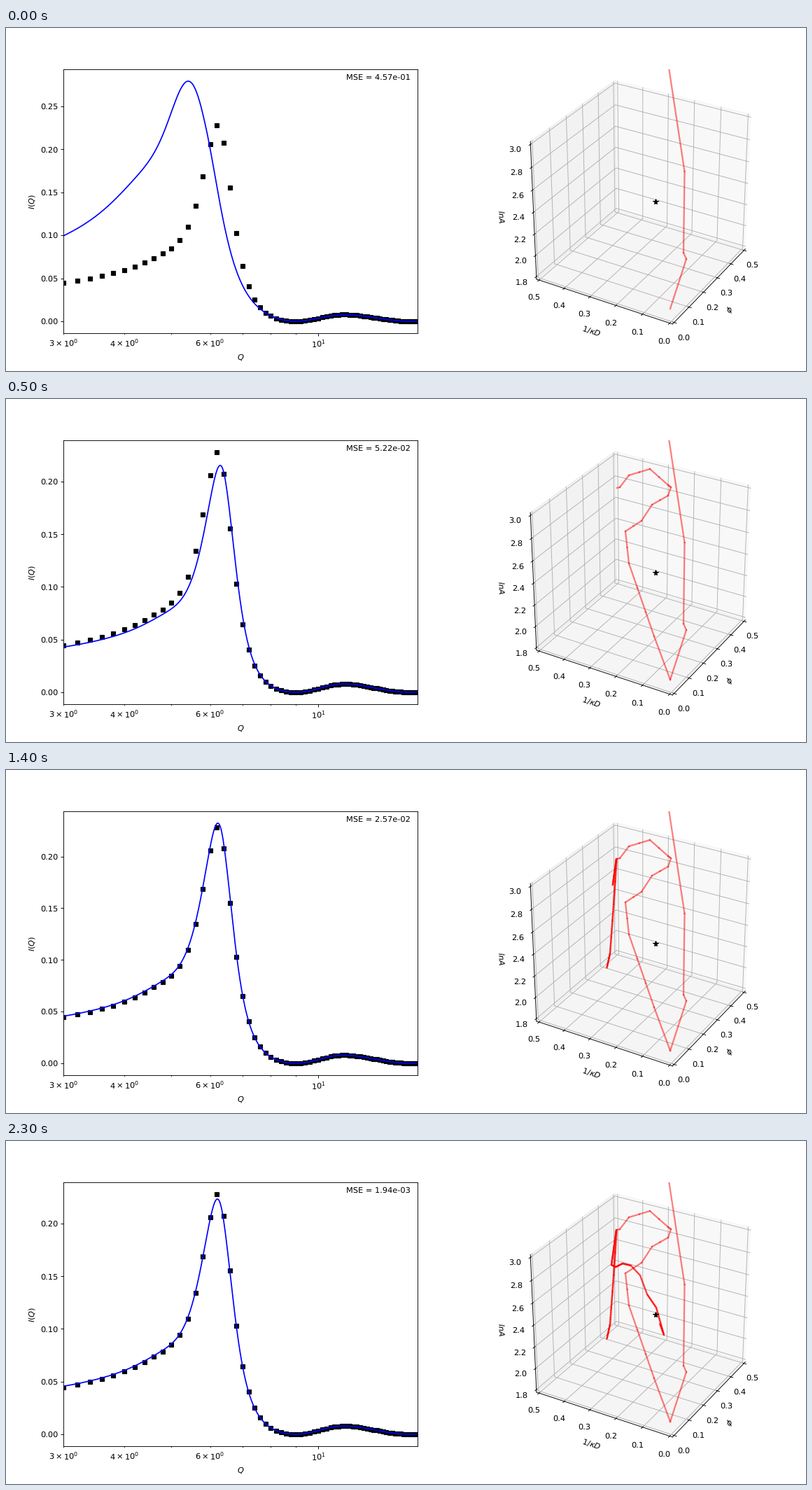
These frames come from a looping animation (1143x490 px, 2.5 s). A matplotlib script:

```python
import numpy as np
import matplotlib.pyplot as plt
from matplotlib.animation import FuncAnimation
from matplotlib.collections import LineCollection

plt.rcParams["text.hinting"] = "none"

W, H, DPI = 1143, 490, 81.625
BOTTOM, HEIGHT = 0.11, 0.77
FRAMES, LAST, STEPS = 25, 23, 4

# Frame, then peak position, depth, stiffness, power and error of the fit
FIT_KEYS = np.array([
    (0, 5.87, 0.585, 0.44, 2.27, 4.57e-1),
    (3, 6.54, 0.303, 1.27, 1.85, 6.41e-2),
    (7, 6.40, 0.475, 0.68, 2.18, 4.25e-2),
    (11, 6.40, 0.415, 1.00, 2.00, 3.44e-2),
    (14, 6.39, 0.388, 0.98, 2.00, 2.57e-2),
    (17, 6.385, 0.415, 0.97, 2.00, 1.92e-2),
    (19, 6.385, 0.405, 1.02, 2.00, 5.25e-3),
    (21, 6.385, 0.390, 1.00, 2.00, 3.19e-3),
    (23, 6.385, 0.407, 0.98, 2.00, 1.94e-3),
])

# Corners of the search path: step, then x and y on the stage
PATH_KEYS = np.array([
    (0, 937.5, -6), (1, 969.5, 205), (2, 968, 321), (3, 972, 330), (4, 949, 401),
    (5, 926, 339), (8, 890, 235), (10, 885, 189), (12, 908, 174), (13, 923, 151),
    (15, 946, 138), (16, 950, 126), (18, 946, 123), (20, 920, 100), (22, 890, 109),
    (23, 877, 126), (24, 873, 127), (26, 868.5, 192), (29, 863, 262),
    (32, 858.5, 282.5), (36, 863, 262), (41, 868, 192), (48, 872, 127),
    (64, 865, 177), (67, 871, 180), (72, 881, 175), (76, 893, 178),
    (78, 906, 192), (81, 916, 219), (86, 929, 238), (93, 940, 277), (96, 934, 261),
])


def intensity(q, peak, depth, stiff, power):
    """Sphere form factor over a smooth inverse structure factor."""
    x = q / 2
    form = (3 * (np.sin(x) - x * np.cos(x)) / x**3) ** 2
    d = np.abs(q - peak)
    shape = 1.19 + 0.2 * np.exp(-((d - 1.05) / 0.55) ** 2)
    below = depth + stiff * shape * d**power
    above = 1 - (1 - depth) * np.cos(1.43 * d) / (1 + (d / 2) ** 2)
    return form / np.where(q < peak, below, above)


def along(keys, t):
    """Columns of a key table, interpolated at t."""
    return np.array([np.interp(t, keys[:, 0], col) for col in keys.T[1:]])


q_data = np.arange(3, 16.1, 0.2)
i_data = intensity(q_data, 6.385, 0.397, 1, 2)
q_fine = np.geomspace(3, 16, 500)

# The search slows down: later steps are short and overlap
steps = np.r_[np.arange(32), np.arange(32, 96.1, 0.25)]
path = along(PATH_KEYS, steps).T
segments = np.stack([path[:-1], path[1:]], axis=1)

# A hair over the size, so that truncation gives whole pixels
fig = plt.figure(figsize=((W + 0.01) / DPI, (H + 0.01) / DPI), dpi=DPI)

ax = fig.add_axes([82 / W, BOTTOM, 506 / W, HEIGHT])
ax.plot(q_data, i_data, "ks", snap=False)
fit_line, = ax.plot([], [], "b-")
ax.set_xscale("log")
ax.set_xlim(3, 16)
ax.set_xlabel("$Q$")
ax.set_ylabel("$I(Q)$")
label = ax.text(0.98, 0.982, "", transform=ax.transAxes, ha="right", va="top")

side = HEIGHT * H
left = 715.9
box = [left / W, BOTTOM, side / W, HEIGHT]
ax3 = fig.add_axes(box, projection="3d")
ax3.set_box_aspect((1, 1, 1))
ax3.view_init(elev=30, azim=210)
ax3.set_xticks(np.arange(6) / 10)
ax3.set_yticks(np.arange(6) / 10)
ax3.set_zticks(np.linspace(1.8, 3, 7))
pad = 1 / 48
ax3.set_xlim(-0.5 * pad, 0.5 + 0.5 * pad)
ax3.set_ylim(-0.5 * pad, 0.5 + 0.5 * pad)
ax3.set_zlim(1.8 - 1.2 * pad, 3 + 1.2 * pad)
ax3.set_xlabel(r"$\phi$")
ax3.set_ylabel(r"$1/\kappa D$")
ax3.set_zlabel("$lnA$")

# Flat layer over the cube, in stage pixels
layer = fig.add_axes(box)
layer.axis("off")
layer.set_xlim(left, left + side)
layer.set_ylim(H * (1 - BOTTOM), H * (1 - BOTTOM) - side)
trail = LineCollection([], colors="r", alpha=0.5, linewidths=2, capstyle="projecting")
layer.add_collection(trail, autolim=False)
layer.plot(928.3, 247.8, "k*", ms=7, zorder=3)


def update(i):
    frame = min(i, LAST)
    *params, _ = along(FIT_KEYS, frame)
    error = np.exp(np.interp(frame, FIT_KEYS[:, 0], np.log(FIT_KEYS[:, -1])))
    fit = intensity(q_fine, *params)
    fit_line.set_data(q_fine, fit)
    top = max(fit.max(), i_data.max())
    ax.set_ylim(-0.05 * top, 1.05 * top)
    label.set_text(f"MSE = {error:.2e}")
    trail.set_segments(segments[steps[1:] <= STEPS * (frame + 1)])
    return fit_line, label, trail


anim = FuncAnimation(fig, update, frames=FRAMES, interval=100, repeat=True,
                     repeat_delay=0, blit=False)
plt.show()
```
